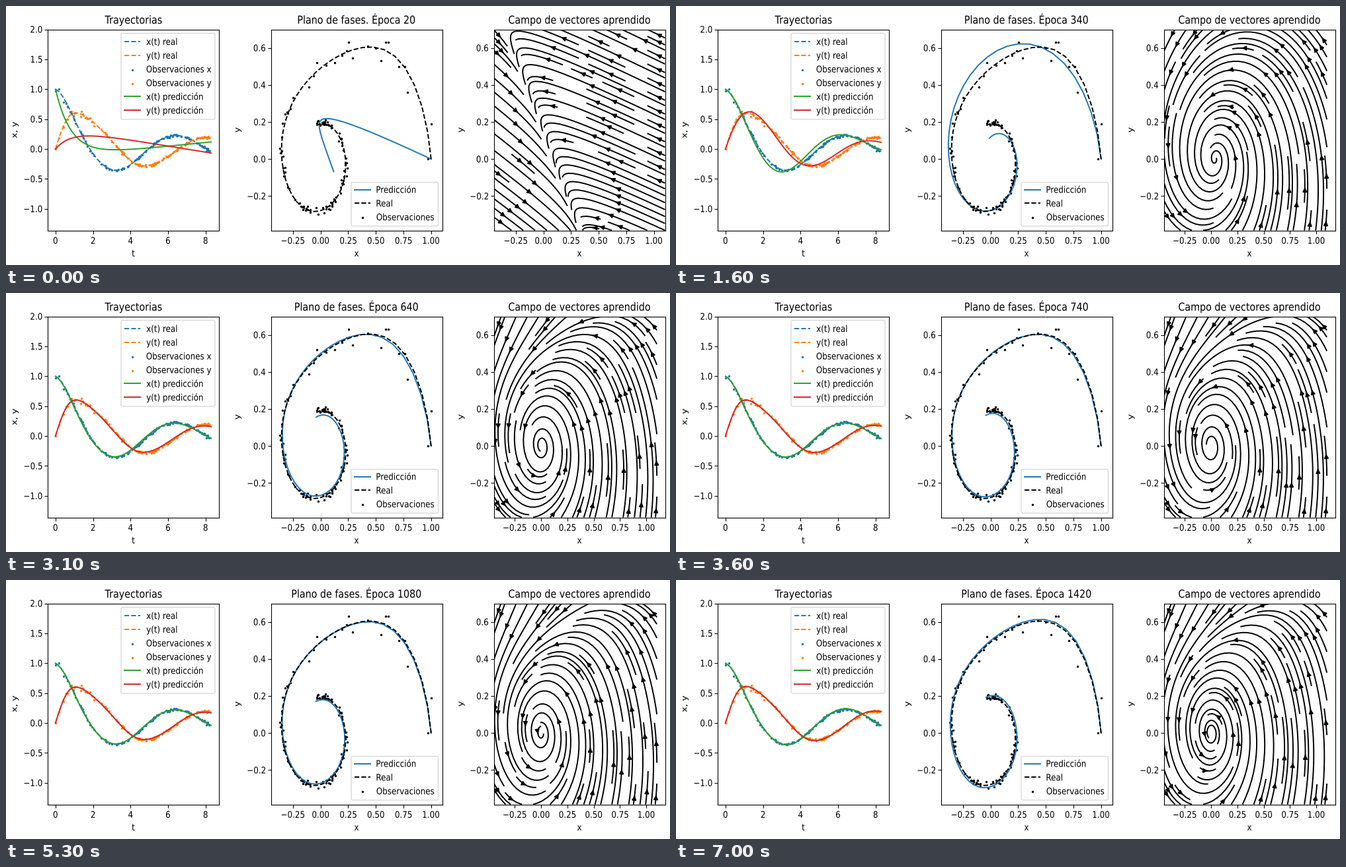
A matplotlib script that plays this animation: 1004 px wide and 393 px high, repeating every 7.1 s.

```python
import numpy as np
import matplotlib.pyplot as plt
from matplotlib.animation import FuncAnimation
from matplotlib.lines import Line2D
from matplotlib.patches import FancyBboxPatch, PathPatch
from matplotlib.textpath import TextPath
from matplotlib.transforms import Affine2D, ScaledTranslation

W, H, DPI = 1004, 393, 64
PX = 72 / DPI                    # points per pixel
SQUEEZE = 0.857                  # horizontal scale of the whole lettering
FRAMES, INTERVAL = 71, 100
TOP, BOTTOM, WIDTH = 35.5, 340.5, 259
BODY, HEAD = 13.89, 16.67
LINE = 1.95 * PX
XLIM, YLIM = (-0.45, 1.1), (-0.385, 0.7)
MARGIN = 0.05 * (XLIM[1] - XLIM[0])

plt.rcParams["font.family"] = "DejaVu Sans"
fig = plt.figure(figsize=(W / DPI, H / DPI), dpi=DPI, facecolor="white")
PIXELS = Affine2D().scale(1, -1).translate(0, H)


# ---------- dynamics ----------
# Learned oscillator by frame: centre, x rate, y rate, x damping, y damping, cubic
KEYS = [6, 16, 25, 36, 53, 70]
PARAMS = np.array([
    [0.040, 1.05, 0.955, 0.180, 0.350, 0.00],
    [0.036, 1.05, 0.955, 0.180, 0.260, 0.35],
    [0.010, 1.00, 1.000, 0.190, 0.085, 1.50],
    [0.000, 1.00, 1.000, 0.160, 0.045, 1.82],
    [0.000, 1.00, 1.000, 0.155, 0.035, 1.90],
    [0.000, 1.00, 1.000, 0.120, 0.030, 1.85],
])
REAL = (0, 1, 1, 0.138, 0.03, 1.92)


def oscillator(x, y, params):
    centre, rate_x, rate_y, damp_x, damp_y, cubic = params
    x = x - centre
    return -rate_x * y - damp_x * x, rate_y * x - damp_y * y - cubic * y**3


def early_field(x, y):
    """Fast collapse onto a line along which the state drifts slowly."""
    dx, dy, slope = 0.031, -0.051, 0.31
    q = ((x - 0.12) * dy - (y + 0.07) * dx) / (dy + slope * dx)
    pull = 1.18 * q
    bend = 0.05 * (1 - np.tanh(12 * q))
    return dx - pull, dy + pull * (slope + bend)


def learned_field(frame):
    params = [np.interp(frame, KEYS, column) for column in PARAMS.T]
    s = min(frame / 6, 1)
    mix = s * s * (3 - 2 * s)

    def field(x, y):
        u, v = oscillator(x, y, params)
        if mix == 1:
            return u, v
        u0, v0 = early_field(x, y)
        return u0 + mix * (u - u0), v0 + mix * (v - v0)
    return field


def integrate(field, times, substeps=2):
    x, y = 1.0, 0.0
    path = [(x, y)]
    h = (times[1] - times[0]) / substeps
    for _ in range((len(times) - 1) * substeps):
        a, b = field(x, y)
        c, d = field(x + h / 2 * a, y + h / 2 * b)
        e, f = field(x + h / 2 * c, y + h / 2 * d)
        g, k = field(x + h * e, y + h * f)
        x += h / 6 * (a + 2 * c + 2 * e + g)
        y += h / 6 * (b + 2 * d + 2 * f + k)
        path.append((x, y))
    return np.array(path[::substeps]).T


times = np.linspace(0, 8.3, 57)
real_x, real_y = integrate(lambda x, y: oscillator(x, y, REAL), times)

# The scattered first observations, then noisy samples of the real path
early = np.array([
    (0, .97, 0), (.2, 1, .19), (.42, .785, .36), (.58, .763, .5),
    (.66, .708, .5), (.8, .615, .63), (.87, .59, .63), (.95, .547, .53),
    (1, .5, .597), (1.08, .427, .61), (1.33, .29, .545), (1.4, .255, .63),
    (1.45, .235, .585), (1.5, .193, .56), (1.6, .128, .52),
    (1.7, .05, .505), (1.85, -.034, .52), (1.95, -.064, .45),
    (2.05, -.106, .387),
])
rng = np.random.default_rng(4)
late = np.sort(rng.uniform(2.2, 8.3, 88))
noise = rng.normal(0, 0.011, (2, late.size))
obs_t = np.r_[early[:, 0], late]
obs_x = np.r_[early[:, 1], np.interp(late, times, real_x) + noise[0]]
obs_y = np.r_[early[:, 2], np.interp(late, times, real_y) + noise[1]]


# ---------- lettering ----------
def glyphs(text, size, align):
    path = TextPath((0, 0), text, size=size)
    box = path.get_extents()
    return path.transformed(
        Affine2D().translate(-box.x0 - align * box.width, 0))


def write(text, x, y, size=BODY, align=0.5, turn=0, trans=PIXELS, dx=0, dy=0):
    place = (Affine2D().rotate_deg(turn).scale(SQUEEZE, 1).translate(dx, dy)
             + ScaledTranslation(x, y, trans))
    patch = PathPatch(glyphs(text, size, align), fc="black", lw=0,
                      transform=place, zorder=6)
    return fig.add_artist(patch)


def number(value, digits):
    return f"{value:.{digits}f}".replace("-", "\u2212")


def panel(left, xlim, ylim, xticks, yticks, digits, labels, title):
    ax = fig.add_axes([left / W, 1 - BOTTOM / H, WIDTH / W, (BOTTOM - TOP) / H])
    ax.set_xticks(xticks)
    ax.set_yticks(yticks)
    ax.set_xlim(xlim)
    ax.set_ylim(ylim)
    ax.tick_params(length=4.6 * PX, width=1.1 * PX,
                   labelbottom=False, labelleft=False)
    for spine in ax.spines.values():
        spine.set_linewidth(1.1 * PX)
    x_labels = {v: write(number(v, digits), v, 0, dy=-20.3,
                         trans=ax.get_xaxis_transform()) for v in xticks}
    for v in yticks:
        write(number(v, 1), 0, v, align=1, dx=-8.5, dy=-5,
              trans=ax.get_yaxis_transform())
    middle = left + WIDTH / 2
    write(labels[0], middle, 380)
    write(labels[1], left + labels[2], (TOP + BOTTOM) / 2, turn=90)
    return ax, x_labels, write(title, middle, 26.8, HEAD)


def dots(color):
    return dict(color=color, ls="", marker="o", ms=3.4 * PX, mew=0, zorder=1)


def legend(box, first_row, entries):
    x0, y0, x1, y1 = box
    fig.add_artist(FancyBboxPatch(
        (x0 + 2.5, y0 + 2.5), x1 - x0 - 5, y1 - y0 - 5,
        boxstyle="round,pad=2.5,rounding_size=2.5", transform=PIXELS,
        fc=(1, 1, 1, 0.8), ec=(0.8, 0.8, 0.8, 0.8), lw=1.3 * PX, zorder=3))
    for row, (text, color, style) in enumerate(entries):
        y = first_row + 20.85 * row
        if style == "o":
            handle = Line2D([x0 + 17], [y + 1], **dots(color))
        else:
            handle = Line2D([x0 + 5, x0 + 29], [y, y], color=color, ls=style,
                            lw=LINE)
        handle.set(transform=PIXELS, zorder=4)
        fig.add_artist(handle)
        write(text, x0 + 38.5, y + 5, align=0)


# ---------- panels ----------
quarters = [-0.25, 0, 0.25, 0.5, 0.75, 1]
heights = [-0.2, 0, 0.2, 0.4, 0.6]
ax_time, _, _ = panel(63, (-0.415, 8.715), (-1.36, 2), [0, 2, 4, 6, 8],
                      np.arange(-1, 2.1, 0.5), 0, ("t", "x, y", -46.5),
                      "Trayectorias")
ax_phase, _, phase_title = panel(400.5, XLIM, YLIM, quarters, heights, 2,
                                 ("x", "y", -47), "Plano de fases. Época 20")
ax_flow, flow_labels, _ = panel(737.5, XLIM, YLIM, [-0.5] + quarters, heights,
                                2, ("x", "y", -46.5),
                                "Campo de vectores aprendido")

ax_time.plot(times, real_x, "--", color="C0", lw=LINE)
ax_time.plot(times, real_y, "--", color="C1", lw=LINE)
ax_time.plot(obs_t, obs_x, **dots("C0"))
ax_time.plot(obs_t, obs_y, **dots("C1"))
line_x, = ax_time.plot([], [], color="C2", lw=LINE)
line_y, = ax_time.plot([], [], color="C3", lw=LINE)

line_phase, = ax_phase.plot([], [], color="C0", lw=LINE)
ax_phase.plot(real_x, real_y, "--", color="black", lw=LINE)
ax_phase.plot(obs_x, obs_y, **dots("black"))

legend((174, 41.5, 316, 172), 54, [
    ("x(t) real", "C0", "--"), ("y(t) real", "C1", "--"),
    ("Observaciones x", "C0", "o"), ("Observaciones y", "C1", "o"),
    ("x(t) predicción", "C2", "-"), ("y(t) predicción", "C3", "-")])
legend((522, 267.5, 653.5, 334), 278.5, [
    ("Predicción", "C0", "-"), ("Real", "black", "--"),
    ("Observaciones", "black", "o")])

grid_x, grid_y = np.linspace(*XLIM, 30), np.linspace(*YLIM, 30)
mesh = np.meshgrid(grid_x, grid_y)
stream_lines = []


def flow_limits(frame):
    left = MARGIN if 4 <= frame < 12 else 0
    right = MARGIN if frame >= 4 else 0
    return XLIM[0] - left, XLIM[1] + right


def update(frame):
    field = learned_field(frame)
    x, y = integrate(field, times)
    line_x.set_data(times, x)
    line_y.set_data(times, y)
    line_phase.set_data(x, y)
    title = f"Plano de fases. Época {20 * (frame + 1)}"
    phase_title.set_path(glyphs(title, HEAD, 0.5))

    for artist in stream_lines + list(ax_flow.patches):
        artist.remove()
    limits = flow_limits(frame)
    ax_flow.set_xlim(limits)
    flow_labels[-0.5].set_visible(limits[0] < -0.5)
    stream = ax_flow.streamplot(grid_x, grid_y, *field(*mesh), color="black",
                                linewidth=LINE, arrowsize=1.45)
    stream_lines[:] = [stream.lines]
    return ()


animation = FuncAnimation(fig, update, frames=FRAMES, interval=INTERVAL,
                          init_func=lambda: (), repeat=True, repeat_delay=0)
plt.show()
```
